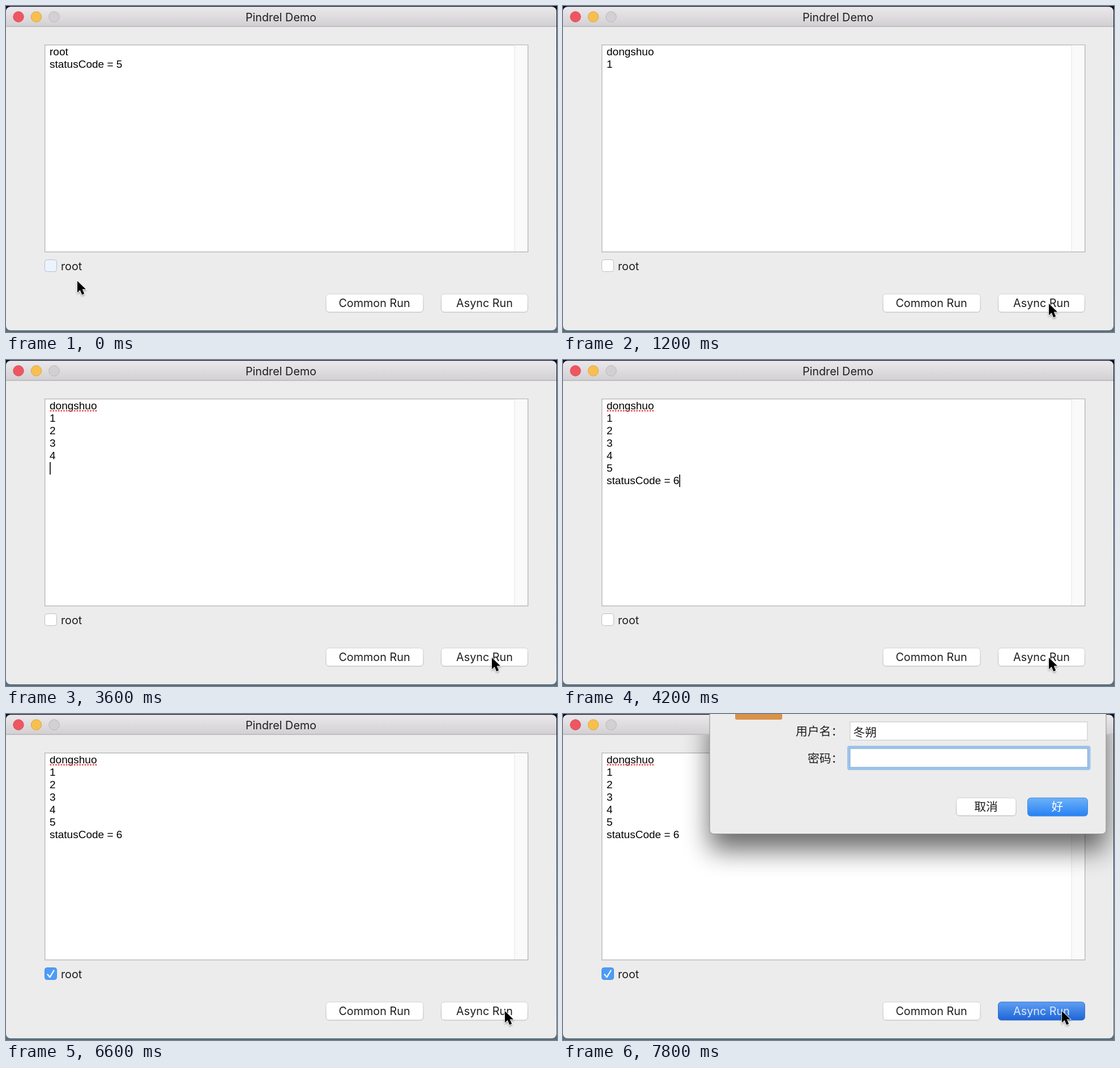
An HTML page that plays this animation: 973x575 px, repeating every 8 s.

```html
<!DOCTYPE html>
<html lang="zh-CN">
<head>
<meta charset="utf-8">
<title>Async demo window</title>
<style>
  html, body { margin: 0; width: 100%; height: 100%; overflow: hidden; background: #10182c; }
  svg { display: block; width: 973px; height: 575px; }
  text { font: 19.8px Inter, sans-serif; fill: #1e1e1e; white-space: pre; }
  .mid { text-anchor: middle; }
  .log text { font: 19px "Liberation Sans", Arial, sans-serif; fill: #000; }
  .zh text { font: 20.8px "Noto Sans CJK SC", "Noto Sans CJK", sans-serif; }
  .btn { fill: #fff; stroke: url(#edge); }
  .field { fill: #fff; stroke: #c3c3c3; }
  .caret { fill: #000; }
</style>
</head>
<body>
<svg viewBox="0 0 973 575">
  <defs>
    <linearGradient id="desk" x2="0" y2="1">
      <stop stop-color="#0b1028"/><stop offset=".5" stop-color="#1f4a5c"/><stop offset="1" stop-color="#5a6f7c"/>
    </linearGradient>
    <linearGradient id="bar" x2="0" y2="1">
      <stop stop-color="#ebe8eb"/><stop offset="1" stop-color="#d2d0d2"/>
    </linearGradient>
    <linearGradient id="edge" x2="0" y2="1">
      <stop stop-color="#d2d2d2"/><stop offset="1" stop-color="#b4b4b4"/>
    </linearGradient>
    <linearGradient id="blue" x2="0" y2="1">
      <stop stop-color="#6cb2f8"/><stop offset="1" stop-color="#2781f4"/>
    </linearGradient>
    <linearGradient id="down" x2="0" y2="1">
      <stop stop-color="#5f9ff3"/><stop offset="1" stop-color="#1e64d6"/>
    </linearGradient>
    <filter id="blur" x="-20%" y="-50%" width="140%" height="200%"><feGaussianBlur stdDeviation="23"/></filter>
    <filter id="drop" x="-50%" y="-50%" width="200%" height="200%">
      <feDropShadow dx="0" dy="2" stdDeviation="1.5" flood-opacity=".35"/>
    </filter>
    <clipPath id="below"><path d="M0 37H972V572H0z"/></clipPath>
  </defs>

  <rect width="973" height="575" fill="url(#desk)"/>
  <rect y="1.5" width="972" height="570.5" rx="8" fill="#ececec"/>
  <path d="M0 36V9.500a8 8 0 0 1 8-8H964a8 8 0 0 1 8 8V36z" fill="url(#bar)"/>
  <path d="M0 36H972" stroke="#b5b3b5" stroke-width="1.4"/>
  <circle cx="22" cy="19" r="9.2" fill="#ee5661" stroke="#d94c56"/>
  <circle cx="53.5" cy="19" r="9.2" fill="#f7bf50" stroke="#dda83f"/>
  <circle cx="85" cy="19" r="9.2" fill="#d2d0d2" stroke="#b9b7b9"/>
  <text class="mid" x="485.500" y="27">Pindrel Demo</text>

  <rect x="68.700" y="68.700" width="853" height="365" fill="#fff" stroke="#b8b8b8" stroke-width="1.400"/>
  <rect x="898" y="69.400" width="23" height="363.600" fill="#fafafa"/>
  <path d="M898 69.400V433" stroke="#e4e4e4"/>
  <g class="log" id="log"></g>
  <path id="spell" d="M79 89.500H161" stroke="#ec4a4f" stroke-width="3" stroke-linecap="round" stroke-dasharray="0 4.700"/>
  <rect id="caret" class="caret" width="1.600" height="22"/>

  <rect id="box" x="68.500" y="447.500" width="21" height="21" rx="4"/>
  <path id="tick" d="M73.500 459.500l4 4.700L84.500 452.500" fill="none" stroke="#fff" stroke-width="2.300" stroke-linecap="round" stroke-linejoin="round"/>
  <text x="97" y="466">root</text>

  <rect class="btn" x="565" y="508" width="172" height="32" rx="5.500"/>
  <text class="mid" x="650.500" y="531">Common Run</text>
  <rect class="btn" id="run" x="768.500" y="508" width="153" height="32" rx="5.500"/>
  <text class="mid" id="runText" x="845" y="531">Async Run</text>

  <g id="sheet">
    <g clip-path="url(#below)">
      <rect x="259" y="10" width="700" height="230" rx="8" opacity=".58" filter="url(#blur)"/>
    </g>
    <rect x="259" y="-20" width="700" height="231.500" rx="7" fill="#ececec" stroke="#8e8e8e"/>
    <rect x="304" y="-73" width="83" height="83" rx="3" fill="#d9924a"/>
    <rect class="field" x="507" y="14" width="419" height="32"/>
    <rect x="502" y="56" width="429.500" height="43" rx="4" fill="#9dc3ea"/>
    <rect x="507" y="61" width="419.500" height="33" fill="#fff" stroke="#7fa9d6"/>
    <rect id="pass" class="caret" x="511.500" y="64" width="1.600" height="28"/>
    <rect class="btn" x="694.500" y="148" width="105.500" height="31.500" rx="5.500"/>
    <rect x="820.500" y="148" width="106" height="32" rx="5.500" fill="url(#blue)" stroke="#3c85e0"/>
    <g class="zh">
      <text x="411" y="38">用户名：</text>
      <text x="432" y="85.500">密码：</text>
      <text x="512.500" y="39.500">冬朔</text>
      <text class="mid" x="747" y="171">取消</text>
      <text class="mid" x="873" y="171" style="fill:#fff">好</text>
    </g>
  </g>

  <path id="arrow" d="M0 0V20.500l4.700-4.400 3.500 8.200 4-1.700-3.500-8.100h6.300z" stroke="#fff" stroke-width="1.600" paint-order="stroke" filter="url(#drop)"/>
</svg>
<script>
const $ = id => document.getElementById(id);
const STEP = 600, LOOP = 8000;
const first = ['root', 'statusCode = 5'];
const user = ['dongshuo', '1', '2', '3', '4', '5', 'statusCode = 6'];
const upTo = n => user.slice(0, n);

// Each step changes only what it names.
const steps = [
  { lines: first, at: [126, 485], box: 'fade' },
  { at: [858, 525], box: 'off' },
  { lines: upTo(2) },
  { lines: upTo(3), spell: true, caret: true },
  { lines: upTo(4) },
  { caret: false },
  { lines: upTo(5), caret: true },
  { lines: upTo(7) },
  { at: [110, 456] },
  { box: 'on', caret: false },
  { at: [881, 524], caret: true },
  { caret: false },
  { sheet: true, pass: true },
  { pass: false }
];
const states = [];
steps.reduce((s, step) => {
  const next = { ...s, ...step };
  states.push(next);
  return next;
}, {});

const rows = user.map((_, i) => {
  const row = document.createElementNS('http://www.w3.org/2000/svg', 'text');
  row.setAttribute('x', 77);
  row.setAttribute('y', 87 + 22 * i);
  return $('log').appendChild(row);
});
const boxes = { off: ['#fff', '#bebebe'], fade: ['#ebf3fd', '#b4c0d0'], on: ['#4c9cf7', '#468fe4'] };
const show = (id, on) => $(id).setAttribute('visibility', on ? 'visible' : 'hidden');

function draw(s) {
  rows.forEach((row, i) => row.textContent = s.lines[i] || '');
  const last = s.lines.length - 1;
  const ended = s.lines[last].startsWith('status');
  $('caret').setAttribute('x', ended ? 205.3 : 77.2);
  $('caret').setAttribute('y', 70 + 22 * (ended ? last : last + 1));
  show('caret', s.caret);
  show('spell', s.spell);
  $('box').setAttribute('fill', boxes[s.box][0]);
  $('box').setAttribute('stroke', boxes[s.box][1]);
  show('tick', s.box === 'on');
  $('sheet').style.display = s.sheet ? '' : 'none';
  show('pass', s.pass);
  $('run').style.fill = s.sheet ? 'url(#down)' : '';
  $('run').style.stroke = s.sheet ? '#2f6fd0' : '';
  $('runText').style.fill = s.sheet ? '#dce9fb' : '';
  $('arrow').setAttribute('transform', `translate(${s.at})`);
}

const start = performance.now();
let shown = -1;
function tick() {
  const i = Math.floor((performance.now() - start) % LOOP / STEP);
  if (i !== shown) draw(states[shown = i]);
  requestAnimationFrame(tick);
}
tick();
</script>
</body>
</html>
```
